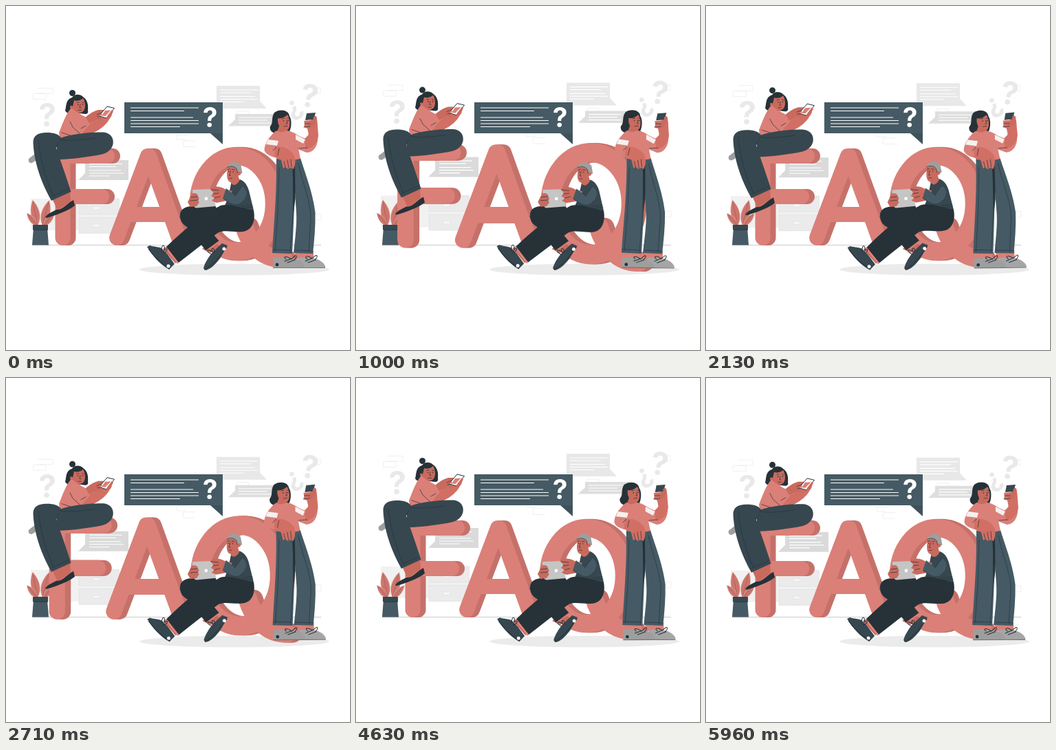
These frames come from a looping animation (500x500 px, 6 s). An HTML page:

```html
<!DOCTYPE html>
<html lang="en">
<head>
<meta charset="utf-8">
<title>FAQ</title>
<style>
html, body { margin: 0; width: 100%; height: 100%; overflow: hidden; background: #fff; }
svg { display: block; width: 100vw; height: 100vh; }
text { font: 700 39px Inter, "Open Sans", sans-serif; text-anchor: middle; }
.thin, .seam, .lace { fill: none; stroke-width: .7; stroke-linecap: round; }
.thin { stroke: #263238; }
.seam { stroke: #22313a; stroke-width: .6; }
.lace { stroke: #263238; stroke-width: 1; }
.skin { fill: #c96a5e; }
.knit { fill: #da8078; }
.ink { fill: #263238; }
.slate { fill: #455a64; }
.deep { fill: #37474f; }
.white { fill: none; stroke: #fff; stroke-width: 1.1; }
</style>
</head>
<body>
<svg viewBox="0 0 500 500">
  <defs>
    <g id="faq" fill="none" stroke-width="22" stroke-linecap="round" stroke-linejoin="round">
      <path d="M147 218H82.500V337M82.500 277H139"/>
      <path d="M161 337L206 218H208L251 337M175 303H238"/>
      <g stroke-width="26.500">
        <ellipse cx="335" cy="287.500" rx="55" ry="69.500"/>
        <path d="M346 320C352 341 369 367 400 367"/>
      </g>
    </g>
    <path id="leaf" d="M0 0C-9 -10 -8 -25 0 -38C8 -25 9 -10 0 0Z"/>
  </defs>

  <g class="float">
    <path d="M46 119.500H68V127H46M58 127.500H39.500V135.500H58ZM248 187.500H265M248 187.500V194H262M275 196H257.500V204.500H275M445 119H457V127H448M336 158V153H353V158M448 302.500H458V311H448" fill="none" stroke="#ededed" stroke-width=".8"/>
    <path d="M36 280H164V330H106V326H36Z" fill="#f1f1f1"/>
    <g fill="#ebebeb" stroke="#e0e0e0" stroke-width=".7">
      <path d="M106 280H164.500V303H106ZM106 307.500H164.500V330.500H106Z"/>
      <path d="M126.500 291.500H136.500V296H126.500ZM126.500 317H136.500V321.500H126.500Z" fill="#f5f5f5"/>
    </g>
  </g>
  <path d="M38 347.600H458" stroke="#bdbdbd" stroke-width=".8"/>
  <ellipse cx="332" cy="383" rx="138" ry="8.300" fill="#ebebeb"/>

  <g class="float">
    <path d="M306 116H369V138.500L379 149H306Z" fill="#e8e8e8"/>
    <path class="white" d="M311 122H366M311 126H356M311 131.500H362M311 135.500H366M311 139.500H346"/>
    <path d="M333 157H397V174.500H323L333 165Z" fill="#dedede"/>
    <path class="white" d="M338 162H385M338 166H380M338 170H385"/>
    <path d="M115 224H178V253H105L115 243Z" fill="#dadada"/>
    <path class="white" d="M121 229.500H169M121 233.500H160M121 239H167M121 243H171M121 247H151"/>
    <g fill="#e9e9e9">
      <text x="60" y="175.500" style="font-size:46px">?</text>
      <text style="font-size:46px" transform="translate(441.500 130) rotate(9)" y="17">?</text>
      <text style="font-size:39px" transform="translate(420 151) rotate(151)" y="14">?</text>
    </g>
  </g>

  <g id="leaves">
    <g fill="#cc766d" stroke="#f3d4cf" stroke-width=".6">
      <use href="#leaf" transform="translate(46 319) rotate(-11)"/>
      <use href="#leaf" transform="translate(53 319) rotate(15)"/>
      <use href="#leaf" transform="translate(46 320) rotate(-40) scale(.65)"/>
      <use href="#leaf" transform="translate(54 320) rotate(42) scale(.65)"/>
    </g>
    <path d="M46 319L39 284M53 319L62 285M46 320L32 303M54 320L68 303" fill="none" stroke="#9e4e47" stroke-width=".5"/>
  </g>
  <path class="slate" d="M40 322H60L62 347.500H38Z"/>
  <path class="deep" d="M39 318H61V325H39Z"/>
  <path class="thin" d="M40 325.500H60.500"/>

  <g id="letters">
    <use href="#faq" x="8" stroke="#c5716a"/>
    <use href="#faq" x="4" stroke="#c5716a"/>
    <use href="#faq" stroke="#da8078"/>
  </g>

  <path class="slate" d="M172 140H315V185H172Z"/>
  <path d="M297 185H315V201Z" fill="#3f525c"/>
  <path class="white" d="M181 148H280M181 152.500H259M181 162H272M181 166.500H280M181 171H280M181 175.500H253"/>
  <text x="296.700" y="176" fill="#fff">?</text>

  <!-- seated woman -->
  <g class="float">
    <path d="M42 215L33 222C32 226 34 229 38 228L46 223Z" fill="#9e9e9e"/>
    <path class="ink" d="M96 133C86 136 88 147 86 152C88 157 94 156 99 155L115 157C118 157 120 155 119 152C120 143 118 136 112 132C107 127 99 128 96 133Z"/>
    <circle class="ink" cx="96.500" cy="126.500" r="4.500"/>
    <path class="skin" d="M99 137C105 139 110 136 112 134C116 140 117 153 109 155C104 157 98 155 96 150Z"/>
    <path class="skin" d="M96 145C92 143 92 150 97 151L95 160L106 160V152Z"/>
    <path class="thin" d="M108 143L107 148H109M105 151.500H109.500M103 140.500L106 140M110.500 140L113 140.500"/>
    <circle class="ink" cx="104.700" cy="143.500" r=".8"/><circle class="ink" cx="111.400" cy="143.300" r=".8"/>
    <path class="knit" d="M95 148C88 155 82 171 77 184L78 192L109 190L112 174C117 166 112 158 104 155Z"/>
    <path class="skin" d="M107 168C115 163 122 154 134 151L148 151L151 157L131 166L111 176Z"/>
    <path d="M110 176C120 172 130 166 138 161L148 156C154 153 156 158 151 163C145 176 123 190 111 187Z" fill="#d16f64"/>
    <path class="knit" d="M92 164C97 157 110 156 116 162L122 172L108 188L95 182Z"/>
    <path d="M135 160L147 146L157.500 148.500L146 163Z" fill="#fff" stroke="#263238"/>
    <path d="M139 159.500L144 152L152.500 151.500L144.500 160Z" fill="#da8078"/>
    <path class="skin" d="M130 157L138 155L140 158L135 160L141 162L137 166L131 163ZM147 160L154 151L156 153L151 163L145 165Z"/>
    <path class="thin" d="M93 168L97 176L109 187M109 178L116 174M132 158L139 155M133 161L139 160M81 184L96 189L108 188"/>
    <path class="skin" d="M67 280L93 269L94 284L75 297Z"/>
    <path class="ink" d="M57 307C60 302 68 299 73 296C83 297 88 287 98 282L100 290C90 298 72 304 59 308Z"/>
    <path class="deep" d="M74 194C91 186 122 183 142 183.500C153 185 157 193 155.500 201C152 214 140 216 126 218C107 221 88 223 74 223Z"/>
    <path class="deep" d="M39.500 199C39 189 46 184 59 184C70 184 77 186 81 193L73 206C78 222 87 246 94.500 270L66 283C53 260 41 230 39.500 199Z"/>
    <path class="seam" d="M78 194C93 197 113 194 129 192M73 206L77 198M66 277L91 266M47 195C50 225 58 252 69 276"/>
  </g>

  <!-- seated man -->
  <g id="man">
    <path class="skin" d="M228 353L239 346L256 367L246 374ZM285 353L301 341L311 349L297 359Z"/>
    <path class="ink" d="M253 304C253 295 261 291 272 291L304 290L309 300L292 321L310 342L291 356L263 321C256 317 253 312 253 304Z"/>
    <path d="M291 356L310 342" stroke="#da8078" stroke-width="2"/>
    <path class="deep" d="M328 254C339 248 349 254 353 268L360 297C353 305 333 304 316 295L323 278Z"/>
    <path class="ink" d="M312 290C326 286 343 294 360 297C363 312 358 327 343 328C331 329 318 325 309 329C289 343 269 359 251 373L233 350C255 329 279 307 312 290Z"/>
    <path d="M232 351L250 374" stroke="#e0857c" stroke-width="2.500"/>
    <g transform="translate(1.500 .5)">
      <path class="skin" d="M325 244L335 243L338 253C333 262 327 261 325 255Z"/>
      <path class="skin" d="M321 235C326 231 334 231 337 237C339 247 333 253 327 256C320 256 318 248 321 235Z"/>
      <path d="M320 234C322 225 335 224 340 231L342 242L336 246L334 236C329 232 325 233 320 234Z" fill="#9e9e9e"/>
      <circle class="skin" cx="337" cy="243" r="2.700"/>
      <path class="thin" d="M325 239L323 246H325M323 250H327M321 237L324 236.500M327 237L331 237.500M320 234C326 231 332 233 334 237L335 242"/>
      <circle class="ink" cx="322.200" cy="240" r=".7"/><circle class="ink" cx="328.600" cy="240.500" r=".7"/>
    </g>
    <path d="M271 268Q271 267 273 267L300 266L305 291L277 293.500Q274 293.500 273.500 291Z" fill="#c5c5c5"/>
    <circle cx="291" cy="280" r="2.400" fill="#fff"/>
    <path class="skin" d="M270 273C276 270 281 275 278 277L281 279L279 283L281 285L277 291L268 292L264 285Z"/>
    <path class="skin" d="M297 266C304 261 311 262 318 266L329 269L322 283L306 286L299 283L303 279L298 276L302 272Z"/>
    <path class="slate" d="M320 265L333 276L343 262C352 267 351 276 344 284C336 294 327 288 315 280Z"/>
    <path class="thin" d="M269 278L279 277M268 283L279 282M298 267L309 268M301 273L309 272M303 279L311 277"/>
    <path class="seam" d="M343 262L333 276M316 280C327 288 336 294 345 283M343 294L359 292M342 291L358 289M252 306C265 319 278 319 292 321M241 352C266 330 290 314 315 302"/>
    <path class="deep" d="M205 350L209 348C215 350 222 350 226 352L234 360L245 375L237 383C223 375 213 363 205 350Z"/>
    <path class="deep" d="M322 348L314 345L301 357C295 364 289 373 287 381L289 384C296 384 304 376 311 367Z"/>
    <path d="M207 353C216 366 227 375 238 382M289 383C301 377 312 363 321 350" fill="none" stroke="#263238" stroke-width="1"/>
    <circle cx="236" cy="378" r="2.500" fill="#fff"/><circle cx="317" cy="353" r="2.500" fill="#fff"/>
    <path class="lace" d="M226 356C226 344 232 347 230 355C236 349 236 357 228 359M299 361C289 356 292 352 300 357C297 351 303 350 303 358"/>
  </g>

  <!-- standing woman -->
  <g id="stander">
    <path class="knit" d="M389 355H415V368H389ZM420 356H447V368H420Z"/>
    <path d="M425 366L444 366C452 367 461 371 464 378V380H425Z" fill="#a5a5a5"/>
    <path d="M388 366L414 366C423 367 430 370 434 377V380H388Z" fill="#9e9e9e"/>
    <path d="M388 380.500H434M434 380.500H464" stroke="#757575" stroke-width="1.200"/>
    <circle class="ink" cx="394" cy="376" r="2.400"/>
    <path class="lace" d="M405 371L416 367M409 373L420 369M415 368C406 362 402 365 407 368M416 367C423 359 424 364 419 369M435 371L446 366M439 373L450 369M445 367C436 361 433 365 438 368M446 366C453 359 454 364 449 369"/>
    <path class="slate" d="M393 220L428 221C434 241 446 271 449.500 300C450 321 448 341 446 360L418 359C420 340 423 317 422 301L420 270L416 360L387 359C389 321 393 280 393 240Z"/>
    <path class="ink" d="M416 225L420 235L420.500 280L418 300L417 250Z"/>
    <path class="seam" d="M418 227L417 300L413 358M397 235L395 300L391 356M425 229C431 258 443 284 443 308L440 357M388 354L415 355M420 355L446 356"/>
    <path class="ink" d="M390 155C398 149 411 151 412 160C416 165 415 179 411 184L396 184C389 187 382 181 384 175C389 170 385 162 390 155Z"/>
    <path class="skin" d="M398 172L408 174L409 184C404 190 396 188 394 183Z"/>
    <path class="skin" d="M395 163C401 164 406 161 409 158C414 165 414 180 407 181C400 180 394 174 395 163Z"/>
    <path class="thin" d="M408 166L409 171H407M404 175L409 174.500M401 164L404.500 163M409 163L411.500 163.500"/>
    <circle class="ink" cx="403.500" cy="167" r=".8"/><circle class="ink" cx="410.300" cy="166.500" r=".8"/>
    <path class="knit" d="M394 181C399 185 405 183 408 181C417 182 426 188 432 195L425 207L428 222C417 225 403 224 393 222L395 205L383 201C383 191 387 184 394 181Z"/>
    <path class="knit" d="M424 188L438 194L440 184L453 186C455 203 447 213 437 213L424 208Z"/>
    <path d="M434 193L440 187L438 178L433 176L434 171L433 167L443 166L448 159C452 160 453 169 453 176L454 188C453 199 445 207 436 208Z" fill="#d16f64"/>
    <path class="deep" d="M437 156L450 155L447 165L435 166Z"/>
    <path class="skin" d="M447 161C451 158 453 162 451 167L449 173L441 177L439 172L446 167Z"/>
    <path d="M421 187L435 194L432 200L421 194Z" fill="#f5f0ef"/>
    <path class="knit" d="M388 186C379 193 374 207 376 211C380 218 390 220 398 222L405 209L393 205L396 195Z"/>
    <path d="M381 194L396 196L394 203L378 201Z" fill="#f5f0ef"/>
    <path d="M391 205C403 203 413 208 419 217C422 225 420 231 418 237L414 235L410 237L406 234L403 236L400 224L390 219Z" fill="#d16f64"/>
    <path class="thin" d="M404 226L406 234M409 224L411 236M414 223L415 234M434 171L442 171M433 176L442 175M393 205L388 210M426 207L438 206M397 207L395 217"/>
  </g>
</svg>
<script>
const $ = id => document.getElementById(id);
const floaters = document.querySelectorAll('.float');

// Linear interpolation through [position, value] stops
function track(stops, p) {
  const i = Math.max(1, stops.findIndex(s => s[0] >= p));
  const [p0, v0] = stops[i - 1], [p1, v1] = stops[i];
  return v0 + (v1 - v0) * (p - p0) / (p1 - p0);
}

const heartbeat = [[0, 1], [.1, 1.1], [.3, 1], [.4, 1], [.5, 1.1], [.6, 1], [1, 1]];
const wind = [[0, 0], [.25, 1], [.75, -1], [1, 0]];
const bob = [[0, 0], [.5, -6.600], [1, 0]];
const setTransform = (node, value) => node.setAttribute('transform', value);

function draw(ms) {
  const slow = ms % 6000 / 6000, fast = ms % 3000 / 3000;
  const rise = track(bob, fast), sway = track(wind, fast);
  floaters.forEach(node => setTransform(node, `translate(0 ${rise})`));
  setTransform($('letters'), `translate(242 292.5) scale(${track(heartbeat, slow)}) translate(-242 -292.5)`);
  setTransform($('man'), `rotate(${sway} 283 306)`);
  setTransform($('stander'), `rotate(${sway} 420 266)`);
  setTransform($('leaves'), `rotate(${sway} 50 302)`);
}

const start = performance.now();
function tick() {
  draw(performance.now() - start);
  requestAnimationFrame(tick);
}
draw(0);
requestAnimationFrame(tick);
</script>
</body>
</html>
```
